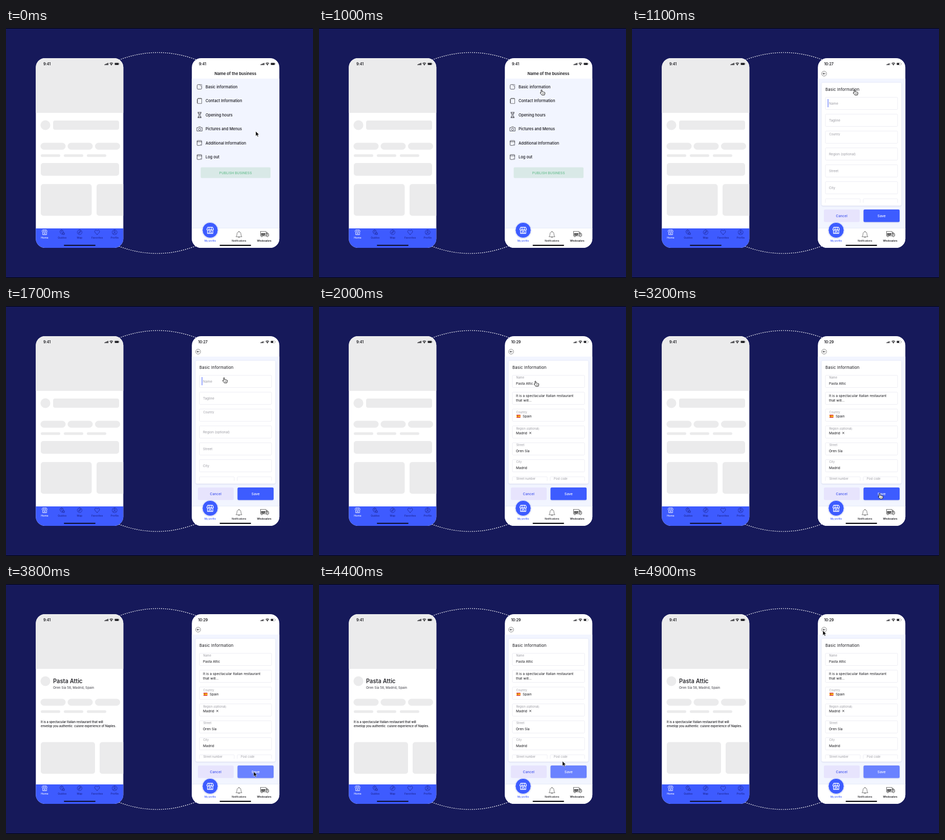
Animation of 600 by 489 pixels, one loop 5 s. Source, as an HTML page:

```html
<!DOCTYPE html>
<html lang="en">
<head>
<meta charset="utf-8">
<style>
html, body { margin: 0; width: 100%; height: 100%; overflow: hidden; background: #16195a; }
svg { display: block; width: 100%; height: 100%; font-family: Inter, "Open Sans", sans-serif; }
.line { fill: none; stroke-linecap: round; stroke-linejoin: round; }
</style>
</head>
<body>
<svg id="stage" viewBox="0 0 600 489"></svg>
<script>
const BLUE = '#3e5bff', GREY = '#ebebec', INK = '#17171c', PALE = '#f2f5ff', NAVY = '#1d2796', HINT = '#9b9ba3';

const rect = (x, y, w, h, fill, r = 0, extra = '') =>
  `<rect x="${x}" y="${y}" width="${w}" height="${h}" rx="${r}" fill="${fill}" ${extra}/>`;
const text = (x, y, size, str, fill = INK, weight = 400, extra = '') =>
  `<text x="${x}" y="${y}" font-size="${size}" fill="${fill}" font-weight="${weight}" ${extra}>${str}</text>`;
const mid = (x, y, size, str, fill, weight) => text(x, y, size, str, fill, weight, 'text-anchor="middle"');
const line = (d, color = INK, width = .7, extra = '') =>
  `<path class="line" d="${d}" stroke="${color}" stroke-width="${width}" ${extra}/>`;
const group = (x, y, body, scale = 1) => `<g transform="translate(${x} ${y}) scale(${scale})">${body}</g>`;
const layer = (id, body) => `<g id="${id}">${body}</g>`;

// Signal, wifi and battery; weak dims the last bar and drains the battery
const status = (x, weak) => group(x, 67, 
  [0, 1, 2, 3].map(i => rect(i * 2, 4 - i * .9, 1.5, 1.6 + i * .9, weak && i == 3 ? '#bbb' : INK, .4)).join('') +
  line('M10.4 2.2Q13.3-.1 16.2 2.2M11.6 3.7Q13.3 2.4 15 3.7', INK, 1.1) +
  `<circle cx="13.3" cy="5" r=".9"/>` +
  rect(19.6, .9, 8.6, 4.6, 'none', 1.3, 'stroke="#888" stroke-width=".5"') +
  rect(20.2, 1.5, weak ? 4.6 : 7.4, 3.4, INK, .8) + rect(28.7, 2.3, .7, 1.8, '#888', .3));

const store = (color, width) =>
  line('M-3.6-4.5H3.6L5-1.2Q4.2.7 2.6-.6Q1.3.9 0-.6Q-1.3.9-2.6-.6Q-4.2.7-5-1.2ZM-4 .6V4.8H4V.6M-1.6-4.3V-.8M1.6-4.3V-.8M-1.4 4.8V2H1.4V4.8', color, width);

function skeleton() {
  const pills = [67.5, 120.5, 174].map(x => rect(x, 224.5, 49, 13.5, GREY, 6.75));
  const bars = [68, 113, 158].map(x => rect(x, 247, 38, 5.2, GREY, 2.6));
  return rect(58, 59, 172, 107, GREY) + text(73, 72.5, 7.1, '9:41', INK, 600) + status(192.5) +
    `<circle cx="77" cy="190" r="9.6" fill="${GREY}"/>` + pills.join('') + bars.join('');
}

const cards = (y, w, x2) => rect(68, y, w, 62, GREY, 5) + rect(x2, y, 80, 62, GREY, 5);

function leftNav() {
  const icons = [
    store('#fff', .8),
    line('M-1-4.5A3.4 3.4 0 0 0-4.2-1Q-4 1.2-1 4Q2 1.2 2.2-1A3.4 3.4 0 0 0-1-4.5M-1-2.2V.2M2 1.2H4.4V4.4H1V2.2Z', NAVY, .9),
    line('M0-4.6A4.6 4.6 0 1 0 .01-4.6M2.2-2.2L.9.9L-2.2 2.2L-.9-.9Z', NAVY, .8),
    line('M0 4.3C-9-1-3-7 0-2.6C3-7 9-1 0 4.3Z', NAVY, .8),
    line('M0-4.8A4.8 4.8 0 1 0 .01-4.8M0-3A1.7 1.7 0 1 0 .01-3M-3.2 3.3Q0-.8 3.2 3.3', NAVY, .8)
  ];
  const names = ['Home', 'Guides', 'Map', 'Favorites', 'Profile'];
  return rect(58, 392, 172, 39, BLUE) + names.map((name, i) => {
    const x = 75.5 + i * 34.2;
    return group(x, 399.5, icons[i]) + mid(x, 411.8, 5.1, name, i ? NAVY : '#fff', 500);
  }).join('') + rect(113, 424, 62, 2.2, '#10112c', 1.1);
}

function menu() {
  const panel = line('M.5 1.5Q.5.5 1.5.5H8.5Q9.5.5 9.5 1.5V6M.5 1.5V9Q.5 10 1.5 10H5.5M.5 2.8H9.5M6.3 9.8L9.6 7M8 10.2L10 8.6');
  const square = line('M6.5 1H2.5Q.6 1 .6 3V8Q.6 10 2.5 10H7.5Q9.5 10 9.5 8V4.5') + line('M7 .8H9.6V3.6H7Z', '#555', .6);
  const sheet = line('M1.5 1.5V10.5H9.5V1.5ZM1.5 1.5L2.5.2H8.8L9.5 1.5M.6 2.5V9.5', '#444');
  const glass = line('M2 .3H8.6M2 10.7H8.6M2.8.4V2.4Q2.8 4 5 5.5Q2.8 7 2.8 8.6V10.6M7.8.4V2.4Q7.8 4 5.6 5.5Q7.8 7 7.8 8.6V10.6M3.7 9.4L5.3 8L6.9 9.4M4 3H6.6', INK, .8);
  const camera = line('M.4 2.6H2.8L3.8 1H7L8 2.6H10.4V9.3H.4ZM5.4 3.6A2.2 2.2 0 1 0 5.41 3.6');
  const icons = [square, sheet, glass, camera, panel, panel];
  const names = ['Basic information', 'Contact Information', 'Opening hours', 'Pictures and Menus', 'Additional Information', 'Log out'];
  return rect(363, 99, 172, 294, PALE) + text(377, 72.5, 7.1, '9:41', INK, 600) + status(497.5) +
    mid(448.5, 92, 7.8, 'Name of the business', INK, 600) +
    names.map((name, i) => group(373, 109.7 + i * 27.5, icons[i]) + text(390, 117.7 + i * 27.55, 7.5, name, INK, 500)).join('') +
    rect(380.5, 272.5, 136.5, 21, '#d9e9e7', 2) + mid(448.7, 285.5, 6.7, 'PUBLISH BUSINESS', '#79c49d', 600);
}

function form() {
  const box = (x, y, w) => rect(x, y, w, 24, '#fff', 1.5, 'stroke="#e9e9f1" stroke-width=".8"');
  const boxes = [0, 1, 2, 3, 4, 5].map(i => box(378, 135.5 + i * 33, 141)).join('');
  const hint = (y, str) => text(385, y, 6.5, str, HINT);
  const label = (y, str, x = 385.5) => text(x, y, 5.6, str, HINT);
  const value = (y, str, x = 385) => text(x, y, 6.6, str);
  const empty = rect(382.6, 139, 1, 16, BLUE) + hint(149.6, 'Name') + hint(182.6, 'Tagline') +
    hint(248.8, 'Region (optional)') + hint(281.8, 'Street') + hint(314.6, 'City');
  const filled = label(142.3, 'Name') + value(153.5, 'Pasta Attic') +
    text(385, 178, 6.8, 'It is a spectacular Italian restaurant') + text(385, 187.2, 6.8, 'that will...') +
    rect(386, 212.8, 7.6, 5.6, '#d8242f', .5) + rect(386, 214.2, 7.6, 2.8, '#ffc61a') + rect(387.5, 214.6, 1.7, 1.8, '#a5552a') +
    value(218, 'Spain', 398) + label(242.2, 'Region (optional)') + value(251, 'Madrid') +
    line('M411.4 246.7L414.6 249.9M414.6 246.7L411.4 249.9', INK, .8) +
    label(274.4, 'Street') + value(285.5, 'Oren Sía') + label(307.4, 'City') + value(318.5, 'Madrid') +
    label(340.4, 'Street number') + label(340.4, 'Post code', 459);
  return rect(363, 99, 172, 294, PALE) +
    text(375.5, 72.5, 7.1, '10:27', INK, 600, 'id="clock"') + status(497.5, true) +
    `<circle cx="375.5" cy="89.3" r="4.8" fill="#fff" stroke="#555" stroke-width=".7"/>` +
    line('M377.7 89.3H373.3M375 87.6L373.3 89.3L375 91', INK, .8) +
    rect(370.5, 107, 156, 240.5, '#fff', 3, 'filter="url(#soft)"') +
    text(378, 123.4, 7.8, 'Basic Information', INK, 400, 'letter-spacing=".14"') + boxes +
    `<g clip-path="url(#fold)">${box(378, 334, 68) + box(452, 334, 67)}</g>` +
    label(210, 'Country') + layer('empty', empty) + layer('filled', filled) +
    rect(375, 355, 70, 24.5, '#e7e4fd', 2.5) + mid(409.7, 369.6, 6.8, 'Cancel', '#4558ee', 500) +
    rect(452.5, 355, 70.5, 24.5, BLUE, 2.5, 'id="save" filter="url(#soft)"') + mid(487.7, 369.6, 6.8, 'Save', '#fff', 500);
}

function rightNav() {
  const bell = line('M-5.5 4.5Q-3.9 3-3.9 0Q-3.9-4.6 0-4.8Q3.9-4.6 3.9 0Q3.9 3 5.5 4.5ZM-1.5 5.9Q0 7.2 1.5 5.9M0-4.9V-6', '#555', .8);
  const truck = line('M-8-4.5H3V4H-4.4M-8-4.5V4H-7M3-2H6L8 .8V4H7M4-.8H5.7L6.8 1H4ZM2.8 4H3.6M-6.3 3H-.6', '#444', .8) +
    rect(-7, -1, 8.5, 3, '#444') + `<circle cx="-5.5" cy="4.6" r="1.4" fill="#fff" stroke="#444" stroke-width=".8"/><circle cx="5.2" cy="4.6" r="1.4" fill="#fff" stroke="#444" stroke-width=".8"/>`;
  return rect(363, 392, 172, 40, '#fff', 0, 'filter="url(#soft)"') +
    `<circle cx="399" cy="395.5" r="15.2" fill="${BLUE}" stroke="#dfe4ff" stroke-width="1" filter="url(#soft)"/>` +
    group(399, 395.5, store('#fff', 1), 1.3) + group(455.3, 403.5, bell) + group(505.5, 402.5, truck) +
    mid(399, 417.6, 4.7, 'My profile', BLUE, 500) + mid(455.3, 417.6, 4.65, 'Notifications', INK, 500) +
    mid(504.5, 417.6, 4.7, 'Wholesalers', INK, 600) + rect(417.5, 424, 61.5, 2.2, '#08080c', 1.1);
}

const details = text(92, 193.6, 11.1, 'Pasta Attic', '#2b2b30', 600) +
  text(92, 204.9, 6.3, 'Oren Sía 58, Madrid, Spain', '#55555c', 500) +
  text(68, 271.5, 5.9, 'It is a spectacular Italian restaurant that will', INK, 500) +
  text(68, 279.9, 5.9, 'envelop you authentic&#160; cuisne experience of Naples.', INK, 500) + cards(309.3, 106, 183);

const arrow = '<path d="M0 0V9.4L2.2 7.4L3.7 10.8L5.3 10.1L3.9 6.8H6.8Z" fill="#080808" stroke="#fff" stroke-width=".6"/>';
const hand = '<path d="M-1 1Q-1-.1 0-.1Q1-.1 1 1V4Q2.4 3.1 3 4.2Q4.4 3.5 4.9 4.7Q6.5 4.3 6.6 5.8Q6.7 8 5.5 10.2H.6Q-.8 8-2.7 6.2Q-3.2 4.8-1 5.8Z" fill="#fff" stroke="#111" stroke-width=".9" stroke-linejoin="round"/><path d="M1.6 6.3V8.6M3 6.3V8.6M4.4 6.3V8.6" stroke="#111" stroke-width=".5"/>';

document.getElementById('stage').innerHTML = `
  <defs>
    <clipPath id="left"><rect x="58.3" y="59" width="171" height="371" rx="18"/></clipPath>
    <clipPath id="right"><rect x="363.2" y="59" width="171" height="371" rx="18"/></clipPath>
    <clipPath id="fold"><rect x="370" y="330" width="156" height="11.8"/></clipPath>
    <filter id="soft" x="-20%" y="-30%" width="140%" height="160%"><feDropShadow dx="0" dy=".6" stdDeviation="1.2" flood-color="#5060a0" flood-opacity=".28"/></filter>
  </defs>` +
  rect(0, 0, 600, 489, '#16195a') + rect(0, 0, 600, 1, '#000') + rect(0, 488, 600, 1, '#000') +
  '<path d="M217 64Q297 32 377 64M213 424Q295 458 377 424" fill="none" stroke="#fff" stroke-width="1.2" stroke-dasharray="2 2"/>' +
  `<g clip-path="url(#left)">${rect(58, 59, 172, 372, '#fff') + skeleton() +
    layer('blank', rect(92, 181, 129, 18, GREY, 4) + rect(68, 264, 153, 25, GREY, 5) + cards(305.3, 99.5, 177)) +
    layer('details', details) + leftNav()}</g>` +
  `<g clip-path="url(#right)">${rect(363, 59, 172, 372, '#fff') + layer('menu', menu()) + layer('form', form()) + rightNav()}</g>` +
  layer('cursor', layer('arrow', arrow) + layer('hand', hand));

const el = id => document.getElementById(id);
const show = (id, on) => el(id).setAttribute('display', on ? 'inline' : 'none');

// Each move: start time, then the point reached 600 ms later
const start = [488, 202];
const moves = [[0, 435, 121], [1300, 423, 147], [2300, 484, 367], [4300, 373, 91]];

function cursorAt(t) {
  let [x, y] = start;
  for (const [from, tx, ty] of moves) {
    const p = Math.min(1, Math.max(0, (t - from) / 600));
    const k = p * p * (3 - 2 * p);
    x += (tx - x) * k;
    y += (ty - y) * k;
  }
  return [x, y];
}

function draw(now) {
  const t = Math.floor(now % 5000 / 100) * 100;
  const opened = t >= 1100, typed = t >= 2000, saved = t >= 3400, pointing = t >= 800 && t < 3800;
  show('menu', !opened);
  show('form', opened);
  show('empty', !typed);
  show('filled', typed);
  show('blank', !saved);
  show('details', saved);
  show('hand', pointing);
  show('arrow', !pointing);
  el('clock').textContent = typed ? '10:29' : '10:27';
  el('save').setAttribute('fill', saved ? '#6b82ff' : BLUE);
  el('cursor').setAttribute('transform', `translate(${cursorAt(t)})`);
}

const began = performance.now();
function tick() {
  draw(performance.now() - began);
  requestAnimationFrame(tick);
}
tick();
</script>
</body>
</html>
```
